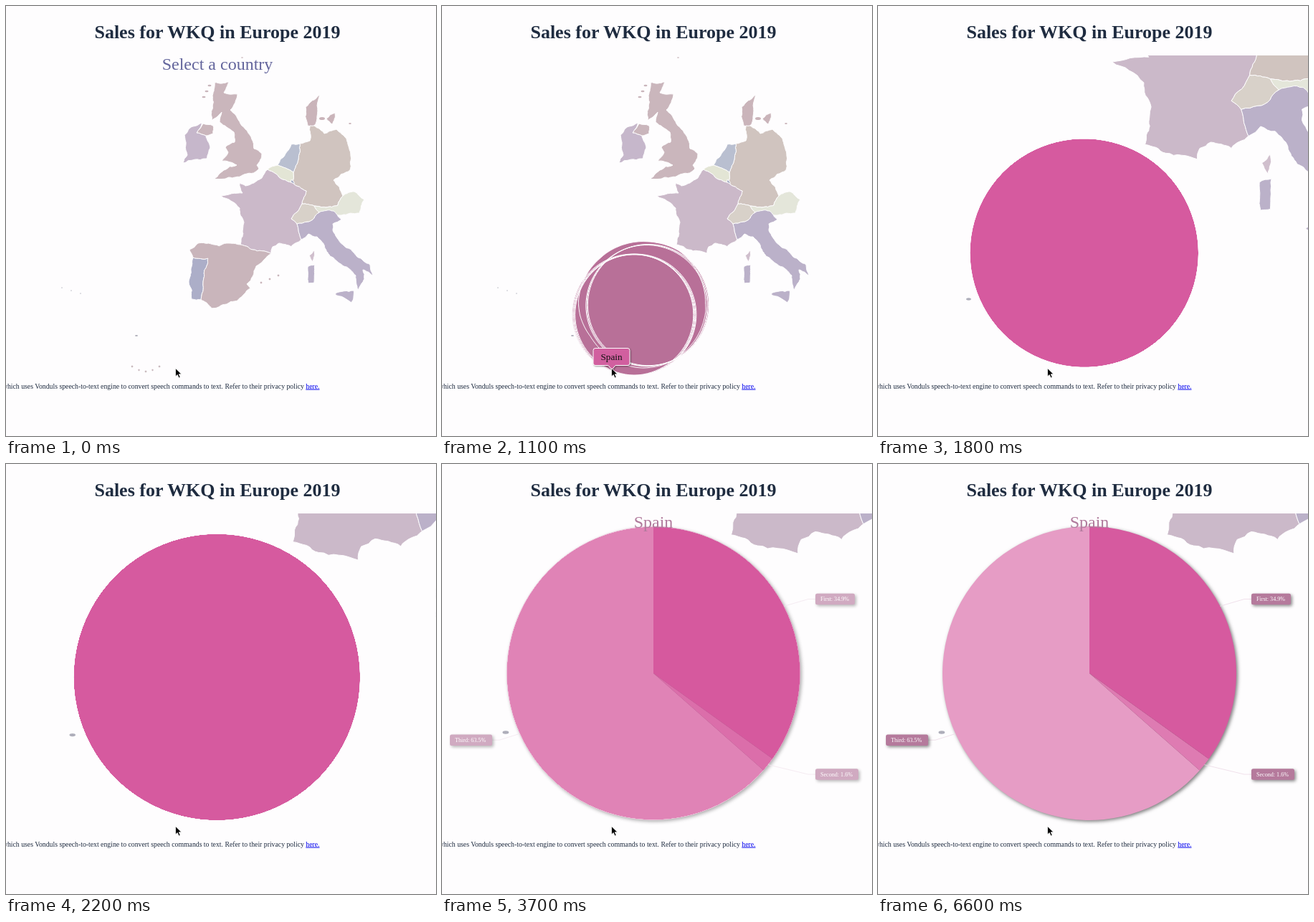
An HTML page that plays this animation: 600x600 px, repeating every 6.8 s.

```html
<!DOCTYPE html>
<html lang="en">
<head>
<meta charset="utf-8">
<title>Sales map</title>
<style>
  html, body { margin: 0; width: 100%; height: 100%; overflow: hidden; background: #fefdfe; }
  svg { display: block; width: 100vw; height: 100vh; }
  text { font-family: "Liberation Serif", "Times New Roman", serif; fill: #1f2c40; }
  .title { font-size: 26px; font-weight: bold; text-anchor: middle; }
  .caption { font-size: 24px; text-anchor: middle; }
  .note { font-size: 9.75px; text-anchor: end; }
  .link { fill: #0000ee; text-decoration: underline; }
  .land path { stroke: #fefdfe; stroke-width: 1; stroke-linejoin: round; vector-effect: non-scaling-stroke; }
  .disc { filter: drop-shadow(2px 2px 2.5px rgba(0, 0, 0, .5)); }
  .label { filter: drop-shadow(2px 2px 2px rgba(0, 0, 0, .45)); }
  .label rect { fill: #b57a9c; }
  .label text { fill: #fff; font-size: 8.1px; }
  .tick { fill: none; stroke: #ecdae6; stroke-width: .8; }
  .tip { filter: drop-shadow(1px 1px 1px rgba(0, 0, 0, .4)); }
  .tip text { font-size: 13.2px; fill: #111; text-anchor: middle; }
</style>
</head>
<body>
<svg viewBox="0 0 600 600">
  <clipPath id="view"><rect x="8" y="69" width="592" height="465"/></clipPath>
  <text class="title" x="295" y="44.500">Sales for WKQ in Europe 2019</text>
  <g clip-path="url(#view)"><g id="map" class="land"></g></g>
  <text id="prompt" class="caption" x="295" y="89" style="fill:#63659c">Select a country</text>
  <g id="pie"></g>
  <text id="country" class="caption" x="295" y="89" style="fill:#b07a9c">Spain</text>
  <text class="note" x="437.5" y="533.6">which uses Vonduls speech-to-text engine to convert speech commands to text. Refer to their privacy policy <tspan class="link">here.</tspan></text>
  <g id="tip" class="tip">
    <path d="M214 477.5h45q3 0 3 3v18q0 3-3 3h-17l-5 6-5-6h-18q-3 0-3-3v-18q0-3 3-3z" fill="#d15f9f" stroke="#fff"/>
    <text x="236.5" y="494">Spain</text>
  </g>
  <path d="M236.500 505.500v11.500l2.700-2.500 2 4.400 2-.9-1.900-4.200h3.700z" fill="#000" stroke="#fff" stroke-width=".8"/>
</svg>
<script>
const LOOP = 6800;
const TAU = 2 * Math.PI;
const $ = id => document.getElementById(id);
const mix = (a, b, k) => a + (b - a) * k;
const mixAll = (a, b, k) => a.map((v, i) => mix(v, b[i], k));
const rgb = color => `rgb(${color.map(Math.round)})`;
const progress = (t, start, length) => Math.min(1, Math.max(0, (t - start) / length));
const cubicOut = u => 1 - (1 - u) ** 3;

function add(parent, tag, attrs = {}) {
  const el = document.createElementNS('http://www.w3.org/2000/svg', tag);
  for (const key in attrs) el.setAttribute(key, attrs[key]);
  return parent.appendChild(el);
}

// Key points of each outline; roughen() supplies the small bends between them.
const LANDS = [
  ['#cab6bc', '291 107 311 106 304 121 323 123 313 145 327 164 343 186 346 199 357 206 350 222 353 227 330 236 291 241 304 229 322 222 301 216 310 204 306 197 319 190 318 176 298 162 301 148 287 160 288 125'],
  ['#cab6bc', '266 177 275 164 289 167 289 178 279 181'],
  ['#c6b7cb', '261 168 273 163 266 177 279 181 285 197 280 213 247 219 253 208 249 180'],
  ['#cab4ba', '418 141 438 124 434 154 430 167 421 167'],
  ['#cab4ba', '447 157 459 149 455 165'],
  ['#d0c4bf', '424 167 430 167 444 178 461 172 475 185 480 229 457 243 470 265 463 278 446 281 430 279 413 276 419 258 400 247 401 232 408 214 410 192 424 188'],
  ['#b9bfd0', '384 213 398 193 410 192 408 214 401 232 379 222'],
  ['#e3e5d5', '365 228 379 222 401 232 400 247 386 242'],
  ['#a6adc4', '398 242 402 246 402 251 397 250'],
  ['#cbb9c9', '365 228 357 240 334 251 326 247 330 261 300 265 326 282 332 302 327 333 344 340 370 345 372 336 381 331 398 336 412 326 406 304 398 297 413 276 419 258 400 247 386 242'],
  ['#d0bfcd', '423 348 430 341 428 357'],
  ['#e4e6da', '430 279 446 281 463 278 470 265 486 259 500 270 493 289 468 292 437 288'],
  ['#bbb1c9', '406 304 420 301 437 288 457 286 468 298 456 304 456 313 470 333 490 350 508 361 512 376 498 368 500 381 491 396 488 376 452 349 434 322 422 318 412 326'],
  ['#bbb1c9', '459 402 485 397 482 414'],
  ['#bbb1c9', '421 364 431 361 430 386 422 387'],
  ['#d8d1c9', '398 297 413 276 430 279 437 288 420 301 406 304'],
  ['#acaec8', '261 351 282 352 275 386 272 410 259 409 255 385']
];
const MAINLAND = '256 340 268 331 327 333 344 340 370 345 349 363 336 388 341 394 323 411 288 422 272 410 275 386 282 352 261 351';

const toPoints = text => text.match(/\S+ \S+/g).map(pair => pair.split(' ').map(Number));
const toPath = points => 'M' + points.map(([x, y]) => x.toFixed(2) + ' ' + y.toFixed(2)).join('L') + 'z';
const distance = (a, b) => Math.hypot(b[0] - a[0], b[1] - a[1]);

// Bends a side the same way from either end, so that neighbours share their border.
function bend(a, b) {
  if (distance(a, b) < 4) return [a];
  const noise = Math.sin((a[0] + b[0]) * 12.9 + (a[1] + b[1]) * 78.2) * 43758;
  const shift = (noise - Math.floor(noise) - .5) * .2 * (a[0] < b[0] ? 1 : -1);
  const middle = [
    (a[0] + b[0]) / 2 + (b[1] - a[1]) * shift,
    (a[1] + b[1]) / 2 - (b[0] - a[0]) * shift
  ];
  return [...bend(a, middle), ...bend(middle, b)];
}
const roughen = points => points.flatMap((a, i) => bend(a, points[(i + 1) % points.length]));

// Evenly spaced points along a closed outline.
function resample(points, count) {
  const sides = points.map((a, i) => {
    const b = points[(i + 1) % points.length];
    return { a, b, length: distance(a, b) };
  });
  const step = sides.reduce((sum, side) => sum + side.length, 0) / count;
  let side = 0, passed = 0;
  return Array.from({ length: count }, (_, i) => {
    while (side < sides.length - 1 && passed + sides[side].length < i * step) passed += sides[side++].length;
    const { a, b, length } = sides[side];
    return mixAll(a, b, (i * step - passed) / length);
  });
}

const CIRCLE = { x: 277, y: 422, r: 94.5 };
const SCALE = 2.17;
const PIE = { x: 295, y: 292, r: 205, labelR: 226.5 };

// Pairs every outline point with its place on the circle, clockwise from the west.
function morphPairs(points, count) {
  return resample(points, count).map((from, i) => {
    const angle = Math.PI + TAU * i / count;
    return [from, [CIRCLE.x + CIRCLE.r * Math.cos(angle), CIRCLE.y + CIRCLE.r * Math.sin(angle)]];
  });
}

const map = $('map');
for (const [fill, outline] of LANDS) add(map, 'path', { fill, d: toPath(roughen(toPoints(outline))) });

const islet = (cx, cy, rx, fill) => add(map, 'ellipse', { cx, cy, rx, ry: rx * .5, fill });
for (let i = 0; i < 3; i++) {
  islet(78 + 13 * i, 393 + 4 * i, 1, '#aeaeba');
  islet(276 + 4 * i, 127 - 8 * i, 2.5, '#cab6bc');
}
islet(182, 460, 2, '#aeaeba');
islet(441, 157, 4, '#cab4ba');
islet(480, 164, 1.8, '#cab4ba');
islet(329.500, 72, 1.5, '#cab6bc');

const spain = add(map, 'path');
const spainParts = [morphPairs(roughen(toPoints(MAINLAND)), 240)];
function addIsland(x, y, size) {
  spainParts.push(morphPairs([[x - size, y], [x, y - size], [x + size, y], [x, y + size]], 90));
}
for (let i = 0; i < 5; i++) addIsland(176 + 9.5 * i, 503 + 7 * Math.sin(i * Math.PI / 4), 1.8);
for (let i = 0; i < 3; i++) addIsland(356 + 12 * i, 386 - 5 * i, 2);

const MUTED = [201, 181, 187], DULL = [184, 112, 152], PINK = [214, 90, 159], WHITE = [255, 255, 255];
const pie = $('pie');
const disc = add(pie, 'g', { class: 'disc' });
const slices = [
  { name: 'First', first: 100 / 135, last: .349, x: 521, width: 55 },
  { name: 'Second', first: 20 / 135, last: .016, x: 521, width: 60 },
  { name: 'Third', first: 15 / 135, last: .635, x: 11, width: 59 }
];
slices.forEach((slice, i) => {
  slice.path = add(disc, 'path', { fill: rgb(mixAll(PINK, WHITE, .2 * i)) });
  slice.tick = add(pie, 'path', { class: 'tick' });
  slice.label = add(pie, 'g', { class: 'label' });
  add(slice.label, 'rect', { x: slice.x, y: -7.8, width: slice.width, height: 15.6, rx: 2.5 });
  slice.text = add(slice.label, 'text', { x: slice.x + 7, y: 2.5 });
});

const onPie = (turn, r) => [PIE.x + r * Math.sin(turn * TAU), PIE.y - r * Math.cos(turn * TAU)];

function drawMap(t) {
  const zoom = cubicOut(progress(t, 1535, 1020));
  const x = (PIE.x - CIRCLE.x * SCALE) * zoom, y = (PIE.y - CIRCLE.y * SCALE) * zoom;
  map.setAttribute('transform', `translate(${x} ${y}) scale(${mix(1, SCALE, zoom)})`);
  const k = cubicOut(progress(t, 50, 2000));
  spain.setAttribute('d', spainParts.map(part => toPath(part.map(([a, b]) => mixAll(a, b, k)))).join(''));
  const dulled = mixAll(MUTED, DULL, progress(t, 50, 1050));
  spain.setAttribute('fill', rgb(mixAll(dulled, PINK, progress(t, 1100, 400))));
}

function drawPie(t) {
  pie.style.opacity = progress(t, 2540, 1850);
  const k = cubicOut(progress(t, 2540, 750));
  let turn = 0;
  for (const slice of slices) {
    const share = mix(slice.first, slice.last, k);
    const middle = turn + share / 2;
    const arc = `A${PIE.r} ${PIE.r} 0 ${share > .5 ? 1 : 0} 1 `;
    slice.path.setAttribute('d', `M${PIE.x} ${PIE.y}L${onPie(turn, PIE.r)}${arc}${onPie(turn + share, PIE.r)}z`);
    const y = onPie(middle, PIE.labelR)[1];
    const right = slice.x > PIE.x;
    const edge = right ? slice.x : slice.x + slice.width;
    slice.tick.setAttribute('d', `M${onPie(middle, PIE.r)}L${edge + (right ? -10 : 10)} ${y}H${edge}`);
    slice.label.setAttribute('transform', `translate(0 ${y})`);
    slice.text.textContent = `${slice.name}: ${(share * 100).toFixed(1)}%`;
    turn += share;
  }
}

function draw(t) {
  drawMap(t);
  drawPie(t);
  $('prompt').style.opacity = 1 - progress(t, 50, 500);
  $('country').style.opacity = cubicOut(progress(t, 2540, 500));
  $('tip').style.opacity = progress(t, 350, 250) * (1 - progress(t, 1350, 280));
}

const begin = performance.now();
function frame() {
  draw((performance.now() - begin) % LOOP);
  requestAnimationFrame(frame);
}
frame();
</script>
</body>
</html>
```
